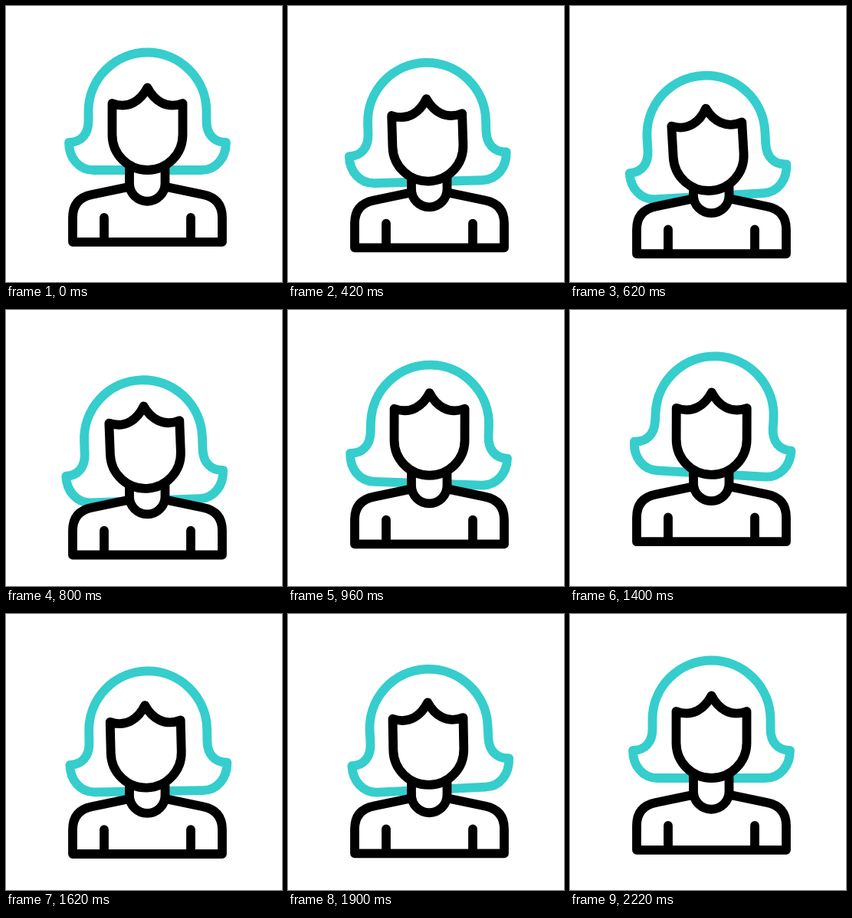
These frames come from a looping animation (360x360 px, 2400 ms). An HTML page:

```html
<!DOCTYPE html>
<html lang="en">
<head>
<meta charset="utf-8">
<title>Woman avatar</title>
<style>
  html, body { margin: 0; width: 100%; height: 100%; overflow: hidden; background: #fff; }
  svg { display: block; width: 100%; height: 100%; }
  path { fill: #fff; stroke: #000; stroke-width: 11.8; stroke-linecap: round; stroke-linejoin: round; }
  #hair { stroke: #36cdcd; }
</style>
</head>
<body>
<svg viewBox="0 0 360 360">
  <path id="hair"/>
  <g id="body">
    <path d="M160 236L112 246Q87 251 87 276V307.8H282V276Q282 251 257 246L209 236M128 276V307.8M241 276V307.8"/>
    <path d="M161 212V231.5A23.25 23.25 0 0 0 207.5 231.5V212"/>
  </g>
  <path id="face" d="M138.5 127C160 135 176 123 184.5 106.5C193 123 209 135 230.5 127V168A46 46 0 0 1 138.5 168Z"/>
</svg>
<script>
const LOOP = 2400, START = 180, END = 2220;

// Each track: times of the three swings, then the value reached at each.
const tracks = {
  bodyY: [[680, 1165, 1710], [16, -13.5, 6.5]],
  faceY: [[640, 1150, 1690], [27, -9.2, 13.5]],
  faceTilt: [[640, 1150, 1690], [-3.3, 1.5, -1.6]],
  hairX: [[680, 1180, 1840], [-7.3, 5.8, -1]],
  hairY: [[730, 1180, 1720], [33.3, -9.3, 16]],
  hairTilt: [[680, 1180, 1840], [-3.4, 5.5, -3]],
  hairDrop: [[730, 1180, 1800], [4.5, -2, 4.5]]
};

const find = id => document.getElementById(id);
const ease = p => (1 - Math.cos(Math.PI * p)) / 2;

function valueAt([swings, peaks], t) {
  const times = [START, ...swings, END];
  const values = [0, ...peaks, 0];
  if (t <= START || t >= END) return 0;
  const i = times.findIndex(end => t < end);
  const p = (t - times[i - 1]) / (times[i] - times[i - 1]);
  return values[i - 1] + (values[i] - values[i - 1]) * ease(p);
}

// The crown keeps its shape while the ends trail by "drop".
function hairPath(drop) {
  const [side, curl, tip, under, hem] = [150, 167, 178, 198, 214].map(y => y + drop);
  return `M107.5 137.5V${side}C107.5 ${curl} 98 ${tip} 82 ${tip}` +
    `C82 ${under} 95 ${hem} 114 ${hem}H255C274 ${hem} 287 ${under} 287 ${tip}` +
    `C271 ${tip} 261.5 ${curl} 261.5 ${side}V137.5A77 77 0 0 0 107.5 137.5Z`;
}

function place(id, x, y, tilt = 0, pivotY = 0) {
  find(id).setAttribute("transform",
    `translate(${x} ${y}) rotate(${tilt} 184.5 ${pivotY})`);
}

function draw(t) {
  const at = name => valueAt(tracks[name], t);
  find("hair").setAttribute("d", hairPath(at("hairDrop")));
  place("hair", at("hairX"), at("hairY"), at("hairTilt"), 137.5);
  place("body", 0, at("bodyY"));
  place("face", 0, at("faceY"), at("faceTilt"), 235);
}

const begin = performance.now();
function tick() {
  draw((performance.now() - begin) % LOOP);
  requestAnimationFrame(tick);
}
tick();
</script>
</body>
</html>
```
